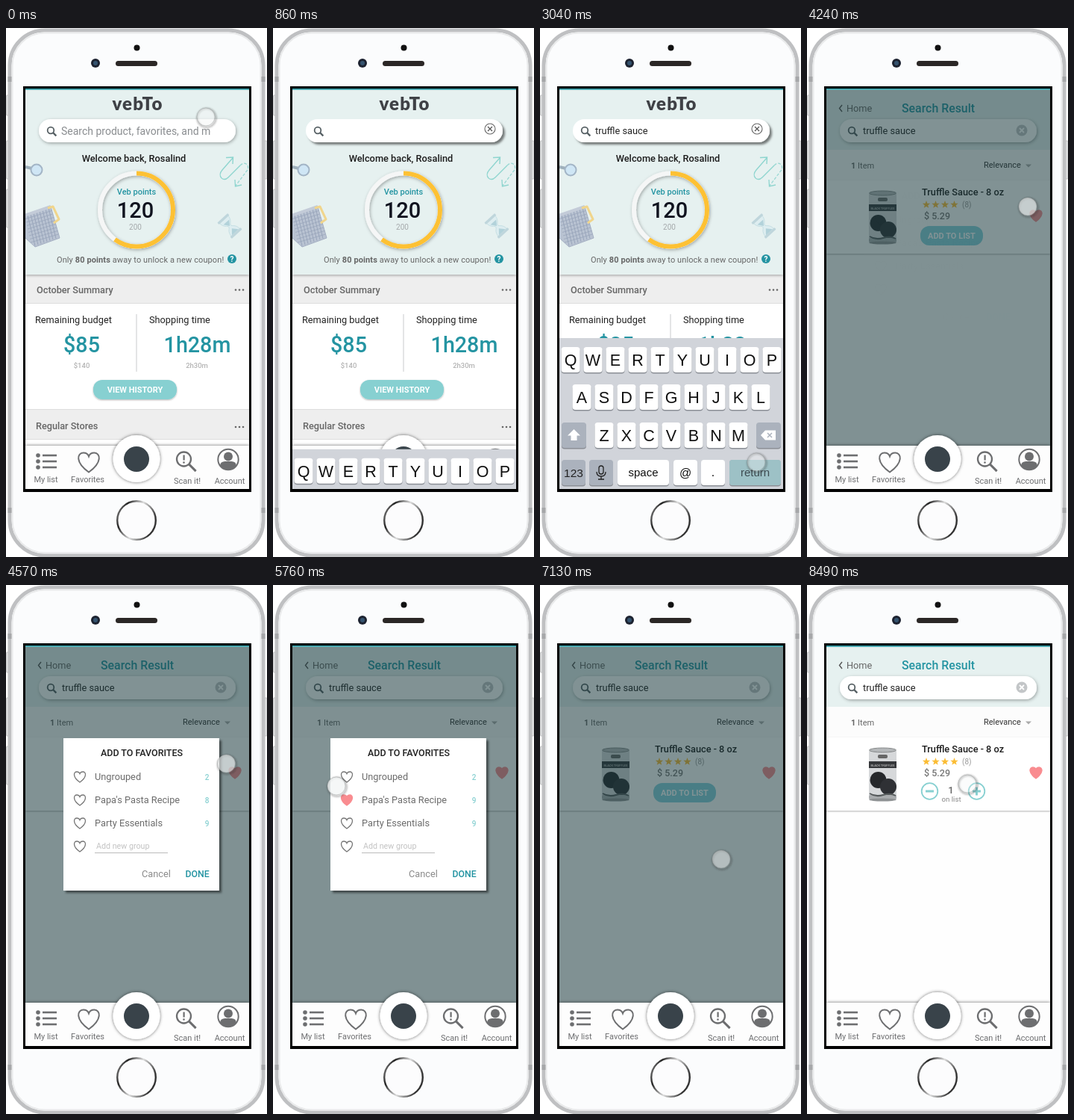
Write an HTML page that moves like this. It is 350 by 708 pixels and loops after 9.26 s.

```html
<!DOCTYPE html>
<html lang="en">
<head>
<meta charset="utf-8">
<title>Grocery app</title>
<style>
  html, body { margin: 0; width: 100%; height: 100%; overflow: hidden; background: #fff; }
  svg { display: block; width: 350px; height: 708px; font-family: Roboto, sans-serif; }
  .m { font-weight: 500; }
  .b { font-weight: 700; }
  .k { font-family: "Liberation Sans", Arial, sans-serif; }
  .logo { font-family: Lato, sans-serif; font-weight: 900; letter-spacing: 1.2px; }
</style>
</head>
<body>
<svg id="stage" viewBox="0 0 350 708"></svg>
<script>
const LOOP = 9260, TEAL = '#2494a2', MINT = '#87d0d1', GREY = '#6d6e70', PINK = '#f98c90';

// Markup helpers
const text = (x, y, size, str, fill = '#222', cls = '', anchor = 'start') =>
  `<text x="${x}" y="${y}" font-size="${size}" fill="${fill}" class="${cls}" text-anchor="${anchor}">${str}</text>`;
const mid = (x, y, size, str, fill, cls) => text(x, y, size, str, fill, cls, 'middle');
const rect = (x, y, w, h, fill, r = 0, more = '') =>
  `<rect x="${x}" y="${y}" width="${w}" height="${h}" rx="${r}" fill="${fill}" ${more}/>`;
const circle = (x, y, r, fill, more = '') => `<circle cx="${x}" cy="${y}" r="${r}" fill="${fill}" ${more}/>`;
const path = (d, stroke, w = 1, fill = 'none', more = '') =>
  `<path d="${d}" stroke="${stroke}" stroke-width="${w}" fill="${fill}" ${more}/>`;
const group = (id, body, more = '') => `<g id="${id}" ${more}>${body}</g>`;
const heart = (x, y, fill, stroke, scale = 1, w = 1.3, id = '') =>
  `<path ${id && `id="${id}"`} transform="translate(${x} ${y}) scale(${scale})" fill="${fill}" stroke="${stroke}" stroke-width="${w / scale}"
    d="M0 7C-10 0-8.500-7-4-7C-2-7-.6-6 0-4.400C.6-6 2-7 4-7C8.500-7 10 0 0 7Z"/>`;
const glass = (x, y, r, stroke, w) =>
  path(`M${x + r * .7} ${y + r * .7}l${r} ${r}`, stroke, w * 1.3) + circle(x, y, r, 'none', `stroke="${stroke}" stroke-width="${w}"`);
const dots = y => [308, 313, 318].map(x => circle(x, y, 1.3, '#666')).join('');
const pill = (id, shadow) => rect(44, 122, 264, 31, '#fff', 15.5, `id="${id}" filter="url(#${shadow})"`) + glass(60, 137, 4.3, '#555f63', 1.8);
const shadow = (id, dx, dy, blur, alpha) =>
  `<filter id="${id}" x="-30%" y="-30%" width="160%" height="160%"><feDropShadow dx="${dx}" dy="${dy}" stdDeviation="${blur}" flood-opacity="${alpha}"/></filter>`;

function star(x, y) {
  const points = Array.from({ length: 10 }, (_, i) => {
    const a = i * Math.PI / 5, r = i % 2 ? 2.3 : 5.4;
    return `${x + r * Math.sin(a)},${y - r * Math.cos(a)}`;
  });
  return `<polygon points="${points.join(' ')}" fill="#fbbd35"/>`;
}

function phone() {
  const side = (x, y, h) => rect(x, y, 4, h, '#e3e4e5', 1, 'stroke="#b5b5b7" stroke-width=".7"');
  return side(.5, 90, 27) + side(.5, 151, 51) + side(.5, 216, 51) + side(346, 151, 51) +
    rect(5, 3, 340, 703, '#fbfcfd', 47, 'stroke="#bfc0c2" stroke-width="5"') +
    rect(8.500, 6.500, 333, 696, '#fbfcfd', 43.500, 'stroke="#e9eaeb" stroke-width="2"') +
    [65, 642].map(y => rect(2.500, y, 5, 7, '#a6a7a9') + rect(342.500, y, 5, 7, '#a6a7a9')).join('') +
    circle(175.500, 26.500, 4, '#111') + circle(120, 47, 6, '#1c2230') + circle(120, 47, 3, '#35536f') +
    rect(147, 44, 56, 7, '#2b2726', 3.5) +
    circle(175, 659, 25.800, '#fcfcfd', 'stroke="url(#metal)" stroke-width="2.4"') +
    rect(23, 78, 306, 543, '#000');
}

function decorations() {
  let weave = '';
  for (let i = 1; i < 9; i++) {
    weave += path(`M${25 + i * 4} ${252 - i * 1.4}L${35 + i * 4} ${293 - i * 1.4}`, '#96a2b8', .9) +
      path(`M${25 + i} ${251 + i * 4.5}L${60 + i * 1.3} ${240 + i * 4.5}`, '#96a2b8', .7);
  }
  return path('M26 186l9 2', '#9fb0bc', 4) + circle(41, 190, 7.5, '#cfe6f5', 'stroke="#a3b5c6" stroke-width="2"') +
    path('M25 251L60 239L72 281L39 293L25 280Z', '#a4aec2', 1, '#b9c3d2') + weave +
    path('M25 251L60 239', '#c3cbd8', 4) + path('M56 241L63 239L71 256L64 261', '#f0d58c', 3, 'none', 'stroke-linejoin="round"') +
    path('M304 174L290 190C283 198 291 207 298 200L314 184M295 173.500L304.500 173L304 182', '#8fd5cf', 1.4) +
    path('M314 184C320 177 328 184 323 191L308 211', '#9ad8d3', 1.3, 'none', 'stroke-dasharray="4 2"') +
    path('M307 203L307.500 212L316 210', '#8fd5cf', 1.3) +
    `<g transform="translate(300 265) rotate(-42) scale(.85)" opacity=".85">
      ${path('M-9 -14C-9 -4-2 -3-2 0C-2 3-9 4-9 14H9C9 4 2 3 2 0C2 -3 9 -4 9 -14Z', '#bcd9df', 1, '#dcedf0')}
      ${path('M-6 -8H6L0 0ZM-7 13L0 5L7 13Z', 'none', 0, '#a9cdd7')}
      ${rect(-11, -17, 22, 4, '#b9d2d9', 1)}${rect(-11, 13, 22, 4, '#b9d2d9', 1)}</g>`;
}

function home() {
  const turn = 2 * Math.PI * 49;
  return rect(26, 82, 300, 535, '#fff') + rect(26, 331, 300, 38, '#eee') + rect(26, 368, 300, 1, '#ddd') +
    rect(26, 510, 300, 41, '#eee') + rect(26, 510, 300, 1, '#ddd') + rect(26, 550, 300, 1, '#ddd') +
    rect(26, 82, 300, 248, '#e6f1f0', 0, 'filter="url(#lift)"') + decorations() +
    mid(176.500, 110, 24, 'vebTo', '#3f4146', 'logo') +
    pill('field', 'soft') +
    `<g id="hint" clip-path="url(#fieldText)">${text(74, 142.500, 14, 'Search product, favorites, and more', '#8a8d90')}</g>` +
    group('clear', circle(291, 135, 7, 'none', 'stroke="#666" stroke-width="1.1"') + path('M288 132l6 6M294 132l-6 6', '#555', 1.3)) +
    group('query', text(74, 142, 12.800, 'truffle sauce')) +
    mid(171.500, 179, 12.800, 'Welcome back, Rosalind', '#1c1c1c', 'm') +
    circle(175, 243.500, 49, 'none', 'stroke="#f5f6f6" stroke-width="6" filter="url(#soft)"') +
    circle(175, 243.500, 49, 'none', `stroke="#fdc134" stroke-width="6" stroke-dasharray="${turn * .6} ${turn}" transform="rotate(-90 175 243.500)"`) +
    mid(175, 223, 11, 'Veb points', TEAL, 'm') + mid(173.500, 254, 29, '120', '#10131f', 'm') + mid(173.500, 270, 10, '200', '#a5a9ab') +
    `<text x="68" y="314" font-size="11" fill="#666" letter-spacing=".1">Only <tspan class="b">80 points</tspan> away to unlock a new coupon!</text>` +
    circle(303, 309, 6, TEAL) + mid(303, 312.700, 10, '?', '#fff', 'b') +
    text(41, 355, 12.700, 'October Summary', '#666', 'm') + dots(350.500) +
    text(39, 395, 12.750, 'Remaining budget') + text(192, 395, 12.750, 'Shopping time') +
    mid(101.500, 434, 28.700, '$85', TEAL, 'm') + mid(256.500, 434, 28.700, '1h28m', TEAL, 'm') +
    mid(101.500, 455, 9.500, '$140', '#b3b3b3', 'm') + mid(256, 455, 9.500, '2h30m', '#b3b3b3', 'm') +
    rect(174.500, 383, 1, 77, '#c9cccd') +
    rect(117, 471, 112, 26, MINT, 12, 'filter="url(#faint)"') + mid(173, 488, 11, 'VIEW HISTORY', '#fff', 'b') +
    text(40, 537, 12.700, 'Regular Stores', '#666', 'm') + dots(534);
}

function can() {
  return rect(83, 221, 37, 67, '#d6d8da', 2) + `<ellipse cx="101.500" cy="221" rx="18" ry="3" fill="#b5b8ba" stroke="#858889"/>` +
    rect(83, 236, 37, 9, '#35373a') + mid(101.500, 242.500, 4, 'BLACK TRUFFLES', '#ddd') +
    rect(95, 227, 13, 5, '#666', 2) +
    circle(95.500, 261, 11, '#26282b') + circle(109, 270, 11, '#2f3135') + rect(83, 281, 37, 6, '#a9acae', 2) +
    path('M84 279q8 5 18 2t17 1', '#555a5b', 2) + `<ellipse cx="101.500" cy="287.500" rx="18" ry="2" fill="#8e9193"/>`;
}

function results() {
  return rect(26, 82, 300, 535, '#fefefe') + rect(26, 163, 300, 41, '#fcfcfc') + rect(26, 82, 300, 81, '#e6f1f0') +
    path('M47 103l-3.500 4.500l3.500 4.500', '#555', 1.4) + text(53, 112, 12.750, 'Home', '#666') +
    mid(176, 113, 15.900, 'Search Result', TEAL, 'm') + pill('field2', 'soft') + text(75, 142, 12.800, 'truffle sauce') +
    circle(288, 137, 7.5, '#c3c6c8') + path('M285 134l6 6M291 134l-6 6', '#fff', 1.8) +
    `<text x="59" y="188" font-size="11" fill="#666"><tspan class="b">1</tspan> Item</text>` +
    text(237, 187, 11, 'Relevance', '#333') + path('M293 182.500h8l-4 4z', 'none', 0, '#aaa') +
    rect(26, 204, 300, 98, '#fff', 0, 'filter="url(#faint)"') + can() +
    text(154, 224, 12.750, 'Truffle Sauce - 8 oz', '#1c1c1c', 'm') +
    [160, 172.500, 185, 197.500].map(x => star(x, 236.500)).join('') + text(208, 239.500, 10, '(8)', '#999') +
    text(157, 256, 12.500, '$ 5.29', '#777', 'm') +
    group('add', rect(152, 265, 84, 26, '#86d3e0', 12) + mid(194, 282, 11, 'ADD TO LIST', '#fff', 'b')) +
    group('counter', [164.500, 227.500].map(x => circle(x, 276, 10.800, '#fff', `stroke="${MINT}" stroke-width="1.8"`) +
      path(`M${x - 5.500} 276h11`, MINT, 3)).join('') + path('M227.500 270.500v11', MINT, 3) +
      mid(193, 279, 13, '1', '#666', 'm') + mid(193.500, 290, 9.700, 'on list', '#888')) +
    heart(307, 251.500, 'none', '#888', 1.07, 1.3, 'like') +
    group('dim', rect(26, 82, 300, 477, '#17373a', 0, 'opacity=".54"'));
}

function popup() {
  const row = (y, label, count, ids = ['', '']) => heart(99, y, '#fff', '#777', 1, 1.3, ids[0]) + text(119, y + 4, 12.750, label, '#6b6b6b') +
    `<text id="${ids[1]}" x="269.500" y="${y + 4}" font-size="10" fill="${MINT}" text-anchor="middle" class="m">${count}</text>`;
  return rect(77, 205, 209, 204, '#fff', 0, 'filter="url(#hard)"') + mid(182, 229, 12.500, 'ADD TO FAVORITES', '#222', 'm') +
    row(257, 'Ungrouped', 2, ['', 'count0']) + row(288, "Papa's Pasta Recipe", 8, ['pick', 'count']) + row(319, 'Party Essentials', 9, ['', 'count2']) +
    heart(99, 350, '#fff', '#777') + text(121, 353, 10.700, 'Add new group', '#c2c2c2') + rect(119, 358, 98, 1, '#bbb') +
    text(182, 391, 12.750, 'Cancel', '#8a8a8a') + text(240.500, 391, 12.300, 'DONE', TEAL, 'm');
}

function tabs() {
  return rect(26, 559, 300, 58, '#fdfdfd', 0, 'filter="url(#lift)"') + circle(175, 576.500, 31.500, '#fff', 'filter="url(#lift)"') +
    circle(175, 577, 17, '#39434a') +
    [572, 580, 588].map(y => circle(43, y, 2.800, GREY) + rect(49, y - 1.300, 19, 2.600, GREY)).join('') +
    heart(111, 581.500, 'none', GREY, 1.850, 2) + glass(238.500, 577, 9.500, GREY, 2.300) + rect(237.500, 571.500, 2.200, 7, GREY) + circle(238.500, 581.500, 1.300, GREY) +
    circle(298, 577.500, 13.700, '#fff', `stroke="${GREY}" stroke-width="2"`) + circle(298, 573.500, 6, GREY) +
    path('M287 585.500C288 579 294 580 298 580S308 579 309 585.500A13 13 0 0 1 287 585.500Z', 'none', 0, GREY) +
    mid(53.500, 608, 11, 'My list', GREY) + mid(109.500, 608, 11, 'Favorites', GREY) +
    mid(243, 610, 11, 'Scan it!', GREY) + mid(300, 610, 11, 'Account', GREY);
}

function keyboard() {
  const key = (x, y, w, fill = '#fff') => rect(x, y + 1.500, w, 34, '#8b8f96', 4) + rect(x, y, w, 34, fill, 4);
  const letters = [['QWERTYUIOP', 41, 427], ['ASDFGHJKL', 56, 477], ['ZXCVBNM', 86, 528]];
  const dark = '#abb2bd';
  return rect(26, 415, 300, 202, '#d1d4da') +
    letters.map(([row, x, y]) => [...row].map((c, i) =>
      key(x + i * 30 - 12.500, y, 25) + mid(x + i * 30, y + 25, 21.500, c, '#111', 'k')).join('')).join('') +
    key(29, 528, 33, dark) + path('M45.500 537l8.500 8.500h-4.500v6.500h-8v-6.500h-4.500z', 'none', 0, '#fff') +
    key(290, 528, 33, dark) + path('M296 545l6-6.500h14v13h-14z', 'none', 0, '#fff') + path('M305 542l6 6M311 542l-6 6', dark, 1.500) +
    key(29, 578, 32, dark) + mid(45, 601, 15.500, '123', '#222', 'k') +
    key(66, 578, 32, dark) + rect(79, 586, 6, 11, 'none', 3, 'stroke="#222" stroke-width="1.3"') + path('M76 594q0 6 6 6t6-6M82 600v4M78 604h8', '#222', 1.300) +
    key(104, 578, 69) + mid(138.500, 600, 15, 'space', '#111', 'k') + key(179, 578, 32) + mid(195, 601, 16, '@', '#111', 'k') +
    key(216, 578, 32) + mid(232, 600, 16, '.', '#111', 'k') +
    key(254, 578, 69, dark) + rect(254, 578, 69, 34, '#9dc1c6', 4, 'id="ready"') + mid(288.500, 600, 15, 'return', '#3c4a50', 'k');
}

document.getElementById('stage').innerHTML = `<defs>
  <clipPath id="screen"><rect x="26" y="82" width="300" height="535"/></clipPath>
  <clipPath id="fieldText"><rect x="70" y="124" width="205" height="28"/></clipPath>
  <linearGradient id="metal" x1="0" x2="1" y2=".4"><stop stop-color="#aaa"/><stop offset=".25" stop-color="#222"/>
    <stop offset=".6" stop-color="#ddd"/><stop offset="1" stop-color="#333"/></linearGradient>
  ${shadow('soft', 1, 1.500, 2, .33)}${shadow('hard', 3, 3, 1.500, .5)}${shadow('faint', 0, 1, 1, .3)}${shadow('lift', 0, 0, 2, .6)}
  <filter id="blur" x="-30%" y="-30%" width="160%" height="160%"><feGaussianBlur stdDeviation="1.1"/></filter></defs>` +
  phone() + rect(26, 81, 300, 1, '#2c9ba5') + `<g clip-path="url(#screen)">` + group('home', home()) + group('results', results()) + tabs() +
  group('keys', keyboard()) + rect(26, 82, 300, 1, '#5fb3ba') + group('popup', popup()) +
  group('cursor', circle(1, 1.300, 12.500, 'none', 'stroke="#333" stroke-opacity=".4" stroke-width="2" filter="url(#blur)"') +
    circle(0, 0, 12, '#f3f5f5', 'id="tip" stroke="#8a8f8f" stroke-opacity=".4"')) + '</g>';

const el = id => document.getElementById(id);
const clamp = v => Math.min(1, Math.max(0, v));
const span = (t, a, b) => clamp((t - a) / (b - a));
const ease = p => p * p * (3 - 2 * p);
const show = (id, on) => el(id).setAttribute('opacity', +on);

// from time, move start, move end, x, y, target x, target y, fill opacity
const moves = [
  [0, 80, 200, 268, 119, 268, 127, .5],
  [600, 2670, 3040, 268, 542, 290, 581, .35],
  [3170, 3340, 4040, 285, 481, 296, 239, .55],
  [4240, 4540, 5550, 296, 239, 94, 277, .6],
  [5760, 6030, 6730, 85, 269, 257, 380, .8],
  [6890, 7530, 8230, 243, 367, 215, 266, .45],
  [8490, 8490, 8491, 215, 266, 215, 266, .3]
];

function draw(t) {
  const found = t >= 3170, typed = span(t, 1470, 1670);
  show('home', !found);
  show('results', found);
  show('hint', t < 600);
  show('clear', t >= 600);
  show('query', typed);
  show('ready', typed);
  el('field').setAttribute('filter', `url(#${t < 530 ? 'soft' : 'hard'})`);
  const rise = 1 - (1 - span(t, 800, 1230)) ** 2;
  show('keys', rise > 0 && !found);
  el('keys').setAttribute('transform', `translate(0 ${202 * (1 - rise)})`);

  const liked = t >= 4240, picked = t >= 5690;
  el('like').setAttribute('fill', liked ? PINK : 'none');
  el('like').setAttribute('stroke', liked ? PINK : '#888');
  show('dim', liked && t < 7160);
  show('popup', span(t, 4240, 4510) * (1 - span(t, 6860, 7130)));
  el('pick').setAttribute('fill', picked ? PINK : '#fff');
  el('pick').setAttribute('stroke', picked ? PINK : '#777');
  el('count').textContent = picked ? 9 : 8;
  show('add', t < 8490);
  show('counter', t >= 8490);

  const [, a, b, x, y, x2, y2, alpha] = moves.findLast(m => t >= m[0]);
  const p = ease(span(t, a, b));
  el('cursor').setAttribute('transform', `translate(${x + (x2 - x) * p} ${y + (y2 - y) * p})`);
  el('tip').setAttribute('fill-opacity', alpha);
  show('cursor', t >= 600 && t < 1670 ? typed : 1);
}

function tick() {
  draw(performance.now() % LOOP);
  requestAnimationFrame(tick);
}
tick();
</script>
</body>
</html>
```
